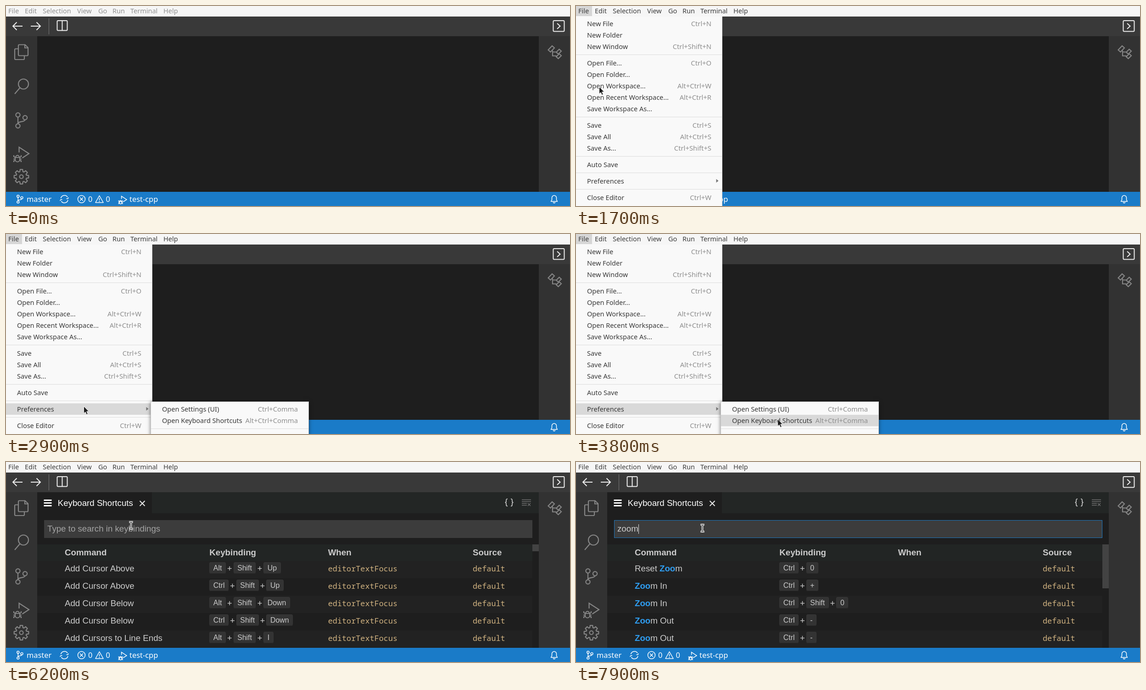
These frames come from a looping animation (1229x437 px, 8 s). An HTML page:

```html
<!DOCTYPE html>
<html lang="en">
<head>
<meta charset="utf-8">
<title>Keyboard shortcuts</title>
<style>
html, body { margin: 0; width: 100%; height: 100%; overflow: hidden; background: #1e1e1e; }
#stage { position: relative; width: 1229px; height: 437px; overflow: hidden; font: 18.7px "Liberation Sans", Arial, sans-serif; color: #ccc; white-space: pre; }
#stage > *, .abs, .row span, .item, hr { position: absolute; }
svg { left: 0; top: 0; overflow: visible; }
.ui { font-family: "Noto Sans", sans-serif; }
#bar { left: 0; top: 0; width: 1229px; height: 23px; background: #f6f6f6; font-size: 14.5px; line-height: 21px; color: #3c3c3c; }
#bar.dim { color: #919191; }
#bar span { position: absolute; top: 0; }
#fileBg { position: absolute; left: 0; top: 0; width: 35px; height: 22px; background: #d6d6d6; }
#editor { left: 68px; top: 66px; width: 1093px; height: 340px; overflow: hidden; }
#tabs { left: 0; top: 0; width: 1093px; height: 46px; background: #232625; }
#tab { left: 0; top: 0; width: 250px; height: 46px; background: #1e1e1e; color: #fff; line-height: 47px; text-indent: 44.7px; }
#input { left: 15px; top: 61px; width: 1064px; height: 39px; background: #3c3c3c; line-height: 38px; text-indent: 7px; }
#input.focus { box-shadow: inset 0 0 0 1px #2077bc; }
#caret { top: 9px; width: 1px; height: 21px; background: #e0e0e0; }
#head { left: 0; top: 114px; width: 1079px; height: 36px; background: #222524; font-weight: bold; line-height: 35px; }
.row { position: absolute; left: 0; width: 1079px; height: 38px; line-height: 33px; }
.row:nth-child(odd) { background: #222; }
.row .mono { font: 16.83px/33px "Noto Sans Mono", monospace; color: #d0b280; }
.row .keys { display: flex; }
.keys i { width: 16.8px; text-align: center; font-style: normal; }
kbd { font: 15.9px/25px "Liberation Sans", Arial, sans-serif; height: 25px; margin-top: 3px; padding: 0 8.5px; border-radius: 4px; background: #333; box-shadow: inset 0 -1px #2a2a2a, inset 0 0 0 1px #383838; }
.row b { color: #2f9df0; }
#thumb { left: 1079px; top: 114px; width: 14px; background: #434343; }
.menu { background: #f9f9f9; color: #383838; font-size: 14.5px; line-height: 25px; box-sizing: border-box; }
#menu { left: 0; top: 23px; width: 319px; height: 420px; border-right: 1px solid #c4c4c4; }
#sub { left: 315px; top: 366px; width: 345px; height: 90px; border: 1px solid #c4c4c4; box-shadow: 0 1px 8px rgba(0,0,0,.5); }
.item { left: 0; right: 0; height: 25px; padding: 0 23px 0 24px; display: flex; justify-content: space-between; }
.item.on { background: #d9d9d9; }
.item em { font-style: normal; font-size: 14.8px; color: #8e8e8e; }
hr { left: 0; right: 0; height: 1px; margin: 0; border: 0; background: #dcdcdc; }
.line { fill: none; stroke-width: 2.2; stroke: #858585; }
.lite { fill: none; stroke: #ececec; stroke-width: 2; }
.thin { fill: none; stroke: #fff; stroke-width: 1.5; }
</style>
</head>
<body>
<div id="stage">
  <svg width="1229" height="437">
    <defs>
      <g id="bug">
        <path d="M28.5 320V308.5L50 322.5 35.5 332"/>
        <path d="M20 331h10v4.5a5 5 0 0 1-10 0zM21 331a4 4.6 0 0 1 8 0M16 334.5h4M30 334.5h4M17 326v3l3 2M33 326v3l-3 2M17 341v-2.500l3-1.500M33 341v-2.500l-3-1.500"/>
      </g>
      <g id="branch">
        <circle cx="26" cy="238" r="4.6"/><circle cx="26" cy="262" r="4.6"/><circle cx="41.500" cy="244" r="4.600"/>
        <path d="M26 242.600v15M41.500 248.600c-1 6-15.500 2-15.500 9"/>
      </g>
    </defs>
    <rect y="23" width="1229" height="43" fill="#393939"/>
    <rect y="66" width="68" height="340" fill="#323232"/>
    <rect x="1161" y="66" width="68" height="340" fill="#323232"/>
    <rect y="406" width="1229" height="31" fill="#1a7bc8"/>
    <path d="M93.500 27v35" stroke="#777"/>
    <g class="lite">
      <path d="M36 44H15M23.500 35.500L15 44l8.500 8.500M54 44h21M66.500 35.500L75 44l-8.500 8.500"/>
      <rect x="111.500" y="32" width="22" height="21.500" rx="2"/><path d="M122.500 32v21.500"/>
      <rect x="1192.500" y="32" width="24" height="23.500" rx="2"/><path d="M1201 38l6.500 6-6.500 6"/>
    </g>
    <g class="line">
      <path d="M27 93.500h-6a2 2 0 0 0-2 2V115a2 2 0 0 0 2 2h17a2 2 0 0 0 2-2v-6.500"/>
      <path d="M29 84.500h12.500l6.500 6.500v15.500a2 2 0 0 1-2 2H29a2 2 0 0 1-2-2v-20a2 2 0 0 1 2-2zM41 84.500V91.500h7"/>
      <circle cx="38" cy="170.500" r="11"/><path d="M30.500 178.500L19 192"/>
      <use href="#branch"/><use href="#bug"/>
      <path id="gear" stroke-linejoin="round"/><circle cx="33.500" cy="373" r="4"/>
      <path d="M1181.500 96l8.500-9 5 4.500-8.500 9zM1199 101l6.500-6.500 4.500 4-6.500 6.500zM1199 111l6.500-6.500 4.500 4-6.500 6.500zM1191 97.500V109h8.500M1191 100.500h8"/>
    </g>
    <g class="thin">
      <use href="#branch" transform="translate(12.500 289.500) scale(.53)" stroke-width="2.800"/>
      <path d="M119.500 420a8 8 0 0 1 14.500-2.500M135 424a8 8 0 0 1-14.500 2.500M131.500 421h3l2-2.500M117.500 425.500l2-2.500h3"/>
      <circle cx="164.500" cy="422" r="8"/><path d="M161 418.500l7 7M168 418.500l-7 7"/>
      <path d="M203.500 414.500l8.500 15h-17zM203.500 419.500v5M203.500 426v2" stroke-linejoin="round"/>
      <use href="#bug" transform="translate(236.500 252) scale(.53)" stroke-width="2.800"/>
      <path d="M1187.500 427h14l-2-3.500v-4.500a5 5 0 0 0-10 0v4.500zM1192.500 428.500a2 2 0 0 0 4 0" stroke-linejoin="round"/>
    </g>
    <g class="ui" fill="#fff" font-size="16.4">
      <text x="45" y="428">master</text><text x="179" y="428">0</text>
      <text x="217.500" y="428">0</text><text x="269" y="428">test-cpp</text>
    </g>
  </svg>

  <div id="editor">
    <div id="tabs" class="abs"></div>
    <div id="tab" class="abs">Keyboard Shortcuts</div>
    <svg class="abs" width="1093" height="46" viewBox="68 66 1093 46">
      <path d="M82.500 83.500h17M82.500 89.500h17M82.500 95.500h17" stroke="#fff" stroke-width="2.800"/>
      <path class="lite" d="M291.500 85l11 11M302.500 85l-11 11"/>
      <path d="M1093 80.500c-2.500 0-3 1-3 3v2c0 2-.5 3-2.500 3 2 0 2.500 1 2.500 3v2c0 2 .5 3 3 3M1100 80.500c2.500 0 3 1 3 3v2c0 2 .5 3 2.500 3-2 0-2.500 1-2.500 3v2c0 2-.5 3-3 3" fill="none" stroke="#c8c8c8" stroke-width="1.700"/>
      <path d="M1124 82.500h20M1124 86.500h20M1124 90.500h11M1124 94.500h11M1137 90l6 6M1143 90l-6 6" stroke="#707070" stroke-width="1.400"/>
    </svg>
    <div id="body" class="abs" style="left:0;top:0">
      <div id="input" class="abs"><span id="query"></span><div id="caret" class="abs"></div></div>
      <div id="head" class="abs"></div>
      <div id="rows" class="abs" style="left:0;top:150px"></div>
      <div id="thumb" class="abs"></div>
    </div>
  </div>

  <div id="bar" class="ui"><div id="fileBg"></div></div>
  <div id="menu" class="menu ui"></div>
  <div id="sub" class="menu ui"></div>
  <svg width="1229" height="437">
    <path id="arrow" d="M.5.5v15.500l3.500-3.200 2.500 5.700 2.800-1.200-2.500-5.500h4.700z" fill="#1c1c1c" stroke="#f4f4f4"/>
    <g id="beam" fill="none">
      <path id="beamLine" d="M-4-7.500h3l1 1 1-1h3M0-7V7M-4 7.500h3l1-1 1 1h3" stroke="#fff" stroke-width="3.400"/>
      <use href="#beamLine"/>
      <path d="M-4-7.500h3l1 1 1-1h3M0-7V7M-4 7.500h3l1-1 1 1h3" stroke="#1c1c1c" stroke-width="1.200"/>
    </g>
  </svg>
</div>
<script>
const LOOP = 8000, STEP = 100;
const $ = id => document.getElementById(id);
const show = (id, on) => { $(id).style.display = on ? "" : "none"; };

// Gear outline: eight teeth
const gear = [];
for (let k = 0; k < 8; k++) {
  for (const [off, r] of [[-.3, 11.5], [-.17, 16], [.17, 16], [.3, 11.5]]) {
    const a = k * Math.PI / 4 + off;
    gear.push((33.5 + r * Math.cos(a)).toFixed(1) + " " + (373 + r * Math.sin(a)).toFixed(1));
  }
}
$("gear").setAttribute("d", "M" + gear.join("L") + "Z");

const bar = { File: 5, Edit: 41, Selection: 80, View: 155, Go: 201, Run: 232, Terminal: 271, Help: 343 };
for (const name in bar) $("bar").innerHTML += `<span style="left:${bar[name]}px">${name}</span>`;

const mainItems = ["New File|Ctrl+N", "New Folder", "New Window|Ctrl+Shift+N", "-",
  "Open File...|Ctrl+O", "Open Folder...", "Open Workspace...|Alt+Ctrl+W",
  "Open Recent Workspace...|Alt+Ctrl+R", "Save Workspace As...", "-",
  "Save|Ctrl+S", "Save All|Alt+Ctrl+S", "Save As...|Ctrl+Shift+S", "-",
  "Auto Save", "-", "Preferences", "-", "Close Editor|Ctrl+W"];
const subItems = ["Open Settings (UI)|Ctrl+Comma", "Open Keyboard Shortcuts|Alt+Ctrl+Comma", "-"];

function fillMenu(id, items) {
  let y = 3, html = "";
  for (const item of items) {
    if (item === "-") {
      html += `<hr style="top:${y + 5}px">`;
      y += 11;
    } else {
      const [name, keys = ""] = item.split("|");
      html += `<div class="item" data-name="${name}" style="top:${y}px">${name}<em>${keys}</em></div>`;
      y += 25;
    }
  }
  $(id).innerHTML = html;
}
fillMenu("menu", mainItems);
fillMenu("sub", subItems);
document.querySelector("[data-name=Preferences]").innerHTML +=
  '<svg class="abs" style="left:305px;top:8px" width="6" height="8"><path d="M.5 0l5 4-5 4z" fill="#777"/></svg>';
const items = [...document.querySelectorAll(".item")];

const COLS = [60, 375.3, 633.7, 949];
const cell = (i, html, cls = "") => `<span class="${cls}" style="left:${COLS[i]}px">${html}</span>`;
$("head").innerHTML = ["Command", "Keybinding", "When", "Source"]
  .map((s, i) => `<span class="abs" style="left:${COLS[i]}px">${s}</span>`).join("");

const allRows = ["Add Cursor Above|Alt Shift Up", "Add Cursor Above|Ctrl Shift Up",
  "Add Cursor Below|Alt Shift Down", "Add Cursor Below|Ctrl Shift Down", "Add Cursors to Line Ends|Alt Shift I"];
const zoomRows = ["Reset Zoom|Ctrl 0", "Zoom In|Ctrl +", "Zoom In|Ctrl Shift 0", "Zoom Out|Ctrl -", "Zoom Out|Ctrl -"];

let shown = null;
function fillRows(filter) {
  if (shown === filter) return;
  shown = filter;
  $("rows").innerHTML = (filter ? zoomRows : allRows).map((row, i) => {
    const [name, keys] = row.split("|");
    const label = filter ? name.replace(new RegExp(filter, "i"), "<b>$&</b>") : name;
    const caps = keys.split(" ").map(k => `<kbd>${k}</kbd>`).join("<i>+</i>");
    return `<div class="row" style="top:${i * 38}px">` + cell(0, label) + cell(1, caps, "keys") +
      cell(2, filter ? "" : "editorTextFocus", "mono") + cell(3, "default", "mono") + "</div>";
  }).join("");
}

// Pointer path: time, x, y
const path = [
  [100, 127, 46], [500, 60, 20], [900, 9, 3], [1200, 9, 3], [1400, 18, 40], [1900, 72, 267], [2100, 100, 318],
  [2300, 130, 354], [2400, 130, 354], [2900, 169, 376], [3000, 169, 376], [3450, 380, 384],
  [3800, 439, 404], [5100, 439, 404], [5500, 390, 320], [6000, 302, 178],
  [6200, 272.5, 138.5], [6700, 272.5, 138.5], [6800, 275.5, 144.5], [LOOP, 275.5, 144.5]
];
function pointer(t) {
  const i = Math.max(1, path.findIndex(p => p[0] >= t));
  const [t0, x0, y0] = path[i - 1], [t1, x1, y1] = path[i];
  const f = (t - t0) / (t1 - t0);
  return [x0 + (x1 - x0) * f, y0 + (y1 - y0) * f];
}

function hovered(t, x, y) {
  const on = [];
  if (t >= 2200 && t < 2500) on.push("Auto Save");
  if (t >= 2500) on.push("Preferences");
  if (t >= 3100 && x > 316) on.push(y < 395 ? "Open Settings (UI)" : "Open Keyboard Shortcuts");
  return on;
}

function draw(now) {
  const t = Math.floor(now % LOOP / STEP) * STEP;
  const between = (a, b) => t >= a && t < b;
  const [x, y] = pointer(t);

  $("bar").className = t < 1100 ? "ui dim" : "ui";
  show("fileBg", between(1200, 4800));
  $("bar").children[1].style.color = between(4700, 4800) ? "#666" : "";
  show("menu", between(1100, 4700));
  show("sub", between(2700, 4700));
  const on = hovered(t, x, y);
  for (const el of items) el.classList.toggle("on", on.includes(el.dataset.name));

  show("editor", t >= 4700);
  show("body", t >= 4900);
  const typed = "zoom".slice(0, Math.max(0, (t - 7500) / STEP));
  $("query").textContent = typed || "Type to search in keybindings";
  $("query").style.color = typed ? "#ccc" : "#a3a3a3";
  $("input").classList.toggle("focus", t >= 6400);
  show("caret", between(6400, 7000) || t >= 7500);
  $("caret").style.left = (typed ? Math.round(7 + $("query").getBoundingClientRect().width) - ($("query").offsetLeft ? 0 : 0) : 7) + "px";
  const filter = typed.slice(0, -1);
  fillRows(filter);
  show("thumb", t >= 5200);
  $("thumb").style.height = filter ? "96px" : "15px";

  const beam = t >= 6100;
  show("arrow", t >= 100 && !beam);
  show("beam", beam);
  $(beam ? "beam" : "arrow").setAttribute("transform", `translate(${beam ? x : Math.round(x)} ${beam ? y : Math.round(y)})`);
}

function tick(now) {
  draw(now);
  requestAnimationFrame(tick);
}
draw(0);
requestAnimationFrame(tick);
</script>
</body>
</html>
```
